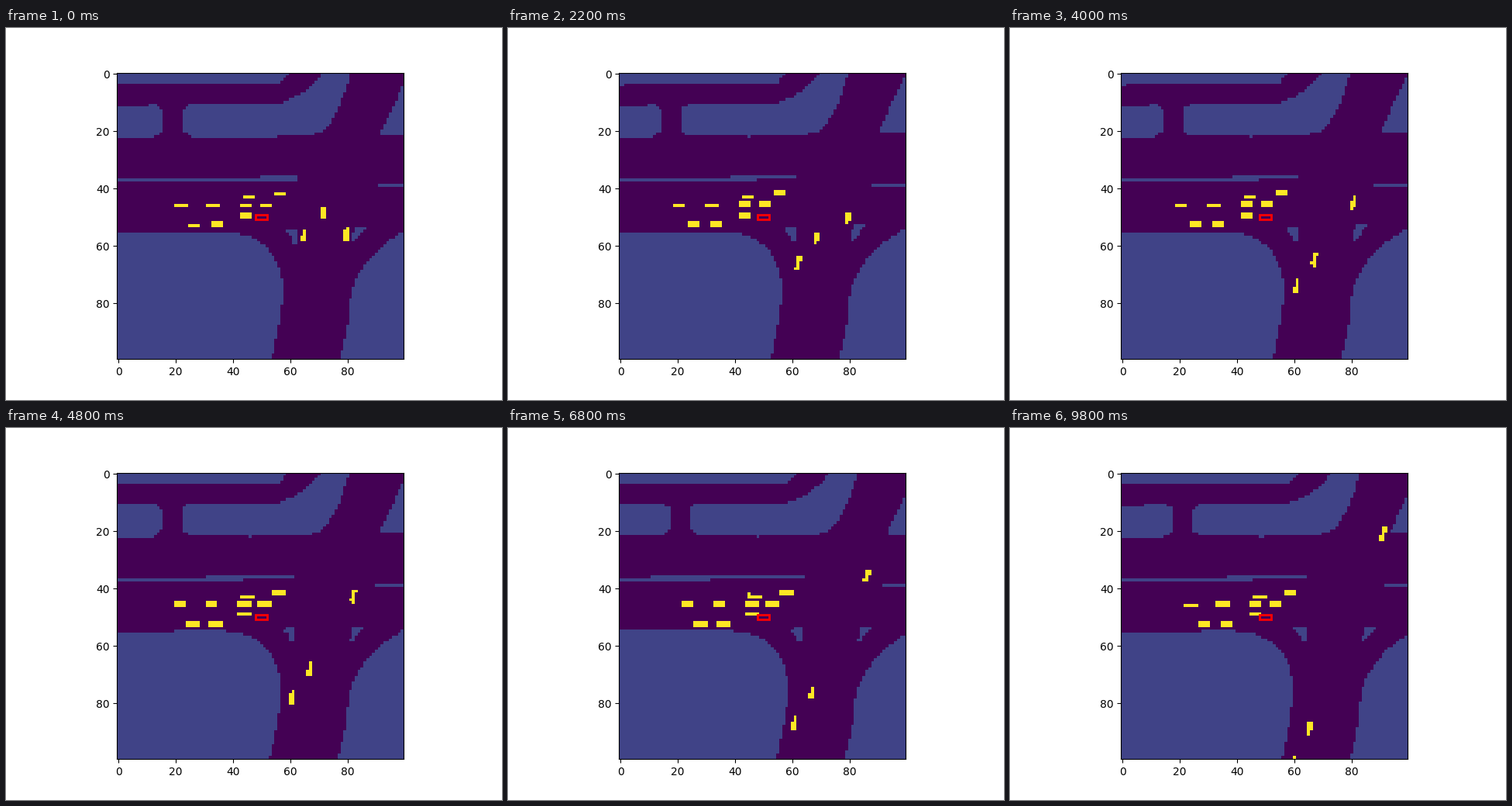
These frames come from a looping animation (640 by 480 pixels, 9.9 s). A matplotlib script:

```python
import numpy as np
import matplotlib.pyplot as plt
from matplotlib.animation import FuncAnimation
from matplotlib.patches import Rectangle
from matplotlib.path import Path

SIZE, MID = 100, 50
FRAMES, INTERVAL = 99, 100
LAND, CAR = 1, 5
CAR_LENGTH, CAR_WIDTH = 4.5, 1.6
EGO_LENGTH, EGO_WIDTH = 4.08, 1.73

# The view drifts and turns a little: step, dx, dy, tilt
POSES = np.array([
    (0, 0, 0, 0),
    (11, -1.15, -0.2, 0.006),
    (20, -1.15, -0.2, 0.006),
    (29, 0.25, -0.3, -0.012),
    (34, 1.4, -0.3, -0.008),
    (42, 2.05, -0.33, 0),
    (49, 2.15, -0.28, 0.003),
])


def bend(start, pull, end, n=14):
    """Points on a quadratic curve."""
    t = np.linspace(0, 1, n)[:, None]
    curve = ((1 - t) ** 2 * np.array(start) + 2 * t * (1 - t) * np.array(pull)
             + t ** 2 * np.array(end))
    return [tuple(p) for p in curve]


NORTH_WEST = [(-5, -5), (62, -5), (60.6, 0), (56.5, 4.2), (-5, 4.45)]
WEST_BLOCK = [(-5, 12), (13.9, 11.4), (16, 13), (16, 20.5), (13, 22.9),
              (-5, 22.9)]
MID_BLOCK = ([(23, 13), (25.5, 11.4)]
             + bend((56, 11), (66, 8.5), (71.8, 0))
             + [(72.5, -4), (82.2, -4)]
             + bend((81.4, 0), (79.5, 9), (75, 16.5))
             + bend((75, 16.5), (73, 21.5), (66, 22))
             + [(55, 22.55), (47.6, 22.6), (47.5, 23.3), (46.5, 23.3),
                (46.4, 22.6), (26.5, 22.55), (23, 20.5)])
NORTH_EAST = [(104, -4), (92, 21), (92, 21.6), (105, 21.6)]
SOUTH_WEST = ([(-5, 56.2), (33, 55.6), (38, 55.7)]
              + bend((39.5, 56), (56, 57), (58, 75))
              + bend((58, 75), (57.3, 86), (54, 100))
              + [(54, 103), (-5, 103)])
SOUTH_EAST = ([(103, 103), (77.5, 103)]
              + bend((77.7, 100), (80.6, 90), (81, 83))
              + bend((81, 83), (81.5, 66), (101, 55)))
LEFT_ISLAND = [(58, 54.8), (63, 54.6), (63, 59.6), (61, 59.6), (61, 57.5)]
RIGHT_ISLAND = [(83, 53.9), (87.3, 53.9), (82.8, 59), (81.9, 59)]
LEFT_MEDIAN = [(-5, 37.35), (63, 36.3), (63, 37.5), (-5, 38.45)]
RIGHT_MEDIAN = [(91, 39.35), (103, 39.35), (103, 40.35), (88.5, 40.33)]
AREAS = [NORTH_WEST, WEST_BLOCK, MID_BLOCK, NORTH_EAST, SOUTH_WEST,
         SOUTH_EAST, LEFT_ISLAND, RIGHT_ISLAND, LEFT_MEDIAN, RIGHT_MEDIAN]

# Centres of the waiting cars
PARKED = [(22.35, 46.53), (33.5, 46.45), (45, 46.4), (52, 46.4),
          (46.15, 43.64), (57, 42.5), (45, 49.93), (26.95, 53.35),
          (35, 53.25)]

# Driving cars: position, velocity and half acceleration per step
MOVERS = [
    ((72, 49), (-0.173, 0.83), (0, 0)),
    ((65.3, 57), (-0.15, 0.9), (0, 0)),
    ((80, 56.6), (0.06, -0.4), (0.0027, -0.0063)),
]

centres = np.arange(SIZE) + 0.5
cells = np.array([(x, y) for y in centres for x in centres])


def to_view(points, step):
    x, y = np.array(points, float).T
    dx, dy, tilt = [np.interp(step, POSES[:, 0], v) for v in POSES.T[1:]]
    return np.column_stack([x + dx + tilt * (y - MID),
                            y + dy - tilt * (x - MID)])


def fill(grid, points, step, value):
    inside = Path(to_view(points, step)).contains_points(cells)
    grid[inside.reshape(SIZE, SIZE)] = value


def car_outline(centre, heading=(1, 0)):
    along = np.array(heading) / np.hypot(*heading)
    across = np.array([-along[1], along[0]])
    a, b = along * CAR_LENGTH / 2, across * CAR_WIDTH / 2
    return np.array(centre) + [a + b, a - b, -a - b, -a + b]


def scene(step):
    grid = np.zeros((SIZE, SIZE))
    for points in AREAS:
        fill(grid, points, step, LAND)
    for centre in PARKED:
        fill(grid, car_outline(centre), step, CAR)
    for start, speed, push in np.array(MOVERS):
        centre = start + speed * step + push * step ** 2
        heading = speed + 2 * push * step
        fill(grid, car_outline(centre, heading), step, CAR)
    return grid


fig, ax = plt.subplots(figsize=(6.4, 4.8), dpi=100)
image = ax.imshow(scene(0), cmap="viridis", vmin=0, vmax=5,
                  interpolation="nearest")
ax.add_patch(Rectangle((MID - EGO_LENGTH / 2, MID - EGO_WIDTH / 2),
                       EGO_LENGTH, EGO_WIDTH, fill=False, edgecolor="red",
                       linewidth=2))


def update(n):
    image.set_data(scene(n // 2))
    return [image]


anim = FuncAnimation(fig, update, frames=FRAMES, interval=INTERVAL,
                     repeat=True, repeat_delay=0)
plt.show()
```
